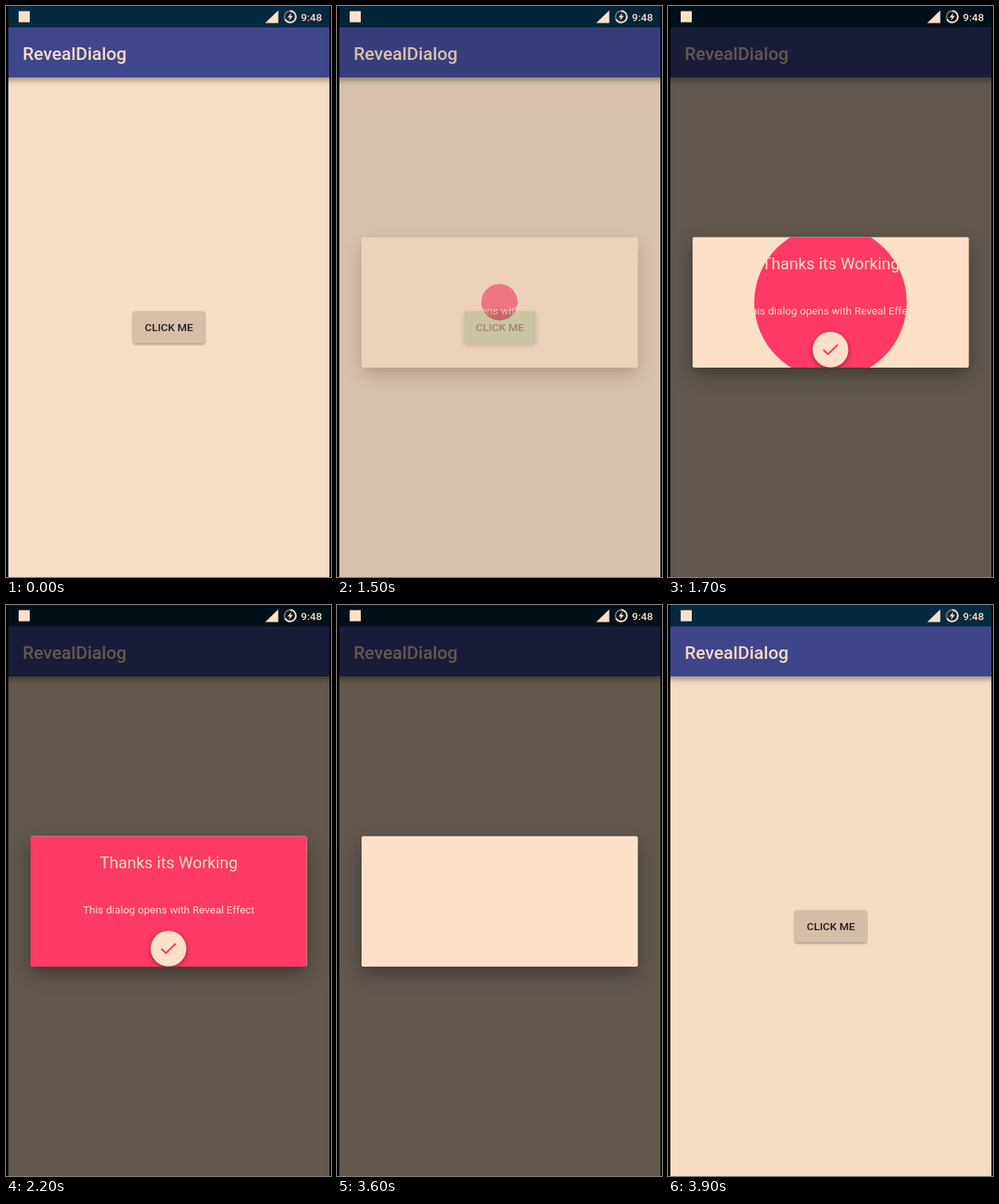
An HTML page with a canvas for the animation above (4 s loop, 410 by 720 pixels).

```html
<!DOCTYPE html>
<html lang="en">
<head>
<meta charset="utf-8">
<title>Reveal dialog</title>
<style>
  html, body { margin: 0; width: 100%; height: 100%; overflow: hidden; background: #000; }
  canvas { display: block; }
</style>
</head>
<body>
<canvas id="stage" width="410" height="720"></canvas>
<script>
const W = 410, H = 720, LOOP = 4000, STEP = 100;
const CREAM = '#fde0c7', PINK = '#ff3a64';
const BOX = { x: 31, y: 291.5, w: 348.5, h: 164.5 };
const CENTER = { x: 205, y: 373.5 };
const REVEAL = { start: 1323, end: 3577, duration: 1070, radius: 348 };

const ctx = document.getElementById('stage').getContext('2d');
const layer = document.createElement('canvas');
layer.width = W;
layer.height = H;
const dlg = layer.getContext('2d');

// Piecewise linear value through [time, value] points
function ramp(t, points) {
  if (t <= points[0][0]) return points[0][1];
  for (let i = 1; i < points.length; i++) {
    const [t0, v0] = points[i - 1], [t1, v1] = points[i];
    if (t <= t1) return v0 + (v1 - v0) * (t - t0) / (t1 - t0);
  }
  return points[points.length - 1][1];
}

const dimAt = t => ramp(t, [[1400, 0], [1500, .12], [1600, .45], [1700, .6],
  [3600, .6], [3700, .45], [3800, .12], [3900, .006], [4000, 0]]);
const opacityAt = t => ramp(t, [[1300, 0], [1400, .06], [1500, .56], [1600, 1],
  [3600, 1], [3700, .4], [3800, 0]]);
const pressAt = t => ramp(t, [[1000, 0], [1100, .5], [1200, 1], [1500, 1], [1700, 0]]);

function revealRadius(t) {
  const elapsed = Math.min(t - REVEAL.start, REVEAL.end - t);
  const p = Math.max(0, Math.min(1, elapsed / REVEAL.duration));
  return REVEAL.radius * (1 - Math.cos(Math.PI * p)) / 2;
}

function rect(c, x, y, w, h, color, radius = 0) {
  c.fillStyle = color;
  c.beginPath();
  c.roundRect(x, y, w, h, radius);
  c.fill();
}

function disc(c, x, y, r, color) {
  c.fillStyle = color;
  c.beginPath();
  c.arc(x, y, r, 0, Math.PI * 2);
  c.fill();
}

function line(c, points, color, width) {
  c.strokeStyle = color;
  c.lineWidth = width;
  c.beginPath();
  points.forEach(([x, y]) => c.lineTo(x, y));
  c.stroke();
}

function polygon(c, points, color) {
  c.fillStyle = color;
  c.beginPath();
  points.forEach(([x, y]) => c.lineTo(x, y));
  c.fill();
}

function label(c, text, x, y, size, color, weight = 400, align = 'center') {
  c.font = `${weight} ${size}px Roboto, sans-serif`;
  c.textAlign = align;
  c.fillStyle = color;
  c.fillText(text, x, y);
}

function withShadow(c, offset, blur, alpha, draw) {
  c.save();
  c.shadowColor = `rgba(0,0,0,${alpha})`;
  c.shadowOffsetY = offset;
  c.shadowBlur = blur;
  draw();
  c.restore();
}

function drawScreen(press) {
  rect(ctx, 0, 0, W, H, '#f7ddc4');
  withShadow(ctx, 3, 8, .4, () => rect(ctx, -10, 27, W + 20, 63, '#3f468c'));
  rect(ctx, 0, 0, W, 27, '#05293f');
  label(ctx, 'RevealDialog', 21, 68, 22.5, '#f8dcc6', 500, 'left');

  const button = color => rect(ctx, 160.5, 385, 90, 40.5, color, 2);
  withShadow(ctx, 1 + 2 * press, 3 + 4 * press, .4, () => button('#d6bfa8'));
  ctx.globalAlpha = press;
  button('#9cb680');
  ctx.globalAlpha = 1;
  label(ctx, 'CLICK ME', 205.5, 410, 13.7, '#251e1b', 500);
}

function drawStatusIcons() {
  rect(ctx, 16, 6.5, 14, 14, CREAM);
  polygon(ctx, [[327, 21.5], [343.5, 21.5], [343.5, 5.5]], CREAM);
  ctx.lineWidth = 2;
  [['#70716f', Math.PI * 1.5], [CREAM, Math.PI * .85]].forEach(([color, end]) => {
    ctx.strokeStyle = color;
    ctx.beginPath();
    ctx.arc(358.5, 13.5, 7.2, -Math.PI / 2, end);
    ctx.stroke();
  });
  polygon(ctx, [[360, 8.5], [355, 14.5], [358, 14.5], [357, 18.5], [362, 12.5], [359, 12.5]], CREAM);
  label(ctx, '9:48', 385.3, 18.5, 13.5, CREAM, 500);
}

function drawDialog(radius) {
  dlg.clearRect(0, 0, W, H);
  withShadow(dlg, 9, 24, .36, () => rect(dlg, BOX.x, BOX.y, BOX.w, BOX.h, CREAM, 2));
  if (radius <= 0) return;

  dlg.save();
  dlg.beginPath();
  dlg.rect(BOX.x, BOX.y, BOX.w, BOX.h);
  dlg.clip();
  dlg.beginPath();
  dlg.arc(CENTER.x, CENTER.y, radius, 0, Math.PI * 2);
  dlg.clip();
  rect(dlg, BOX.x, BOX.y, BOX.w, BOX.h, PINK);
  label(dlg, 'Thanks its Working', 205.3, 332, 20.5, CREAM);
  label(dlg, 'This dialog opens with Reveal Effect', 205.3, 388.7, 13.5, CREAM);
  withShadow(dlg, 2, 6, .4, () => disc(dlg, 205, 433.3, 22.5, CREAM));
  line(dlg, [[196, 433.5], [201.7, 439], [214.2, 427]], '#f03a62', 2.2);
  dlg.restore();
}

function draw(t) {
  const opacity = opacityAt(t);
  drawScreen(pressAt(t));
  rect(ctx, 0, 0, W, H, `rgba(0,0,0,${dimAt(t)})`);
  drawStatusIcons();
  if (opacity > 0) {
    drawDialog(revealRadius(t));
    ctx.globalAlpha = opacity;
    ctx.drawImage(layer, 0, 0);
    ctx.globalAlpha = 1;
  }
  rect(ctx, 0, 0, 3, H, '#000');
  rect(ctx, 408, 0, 2, H, '#000');
}

function frame() {
  const t = performance.now() % LOOP;
  draw(Math.floor(t / STEP) * STEP);
  requestAnimationFrame(frame);
}
frame();
</script>
</body>
</html>
```
